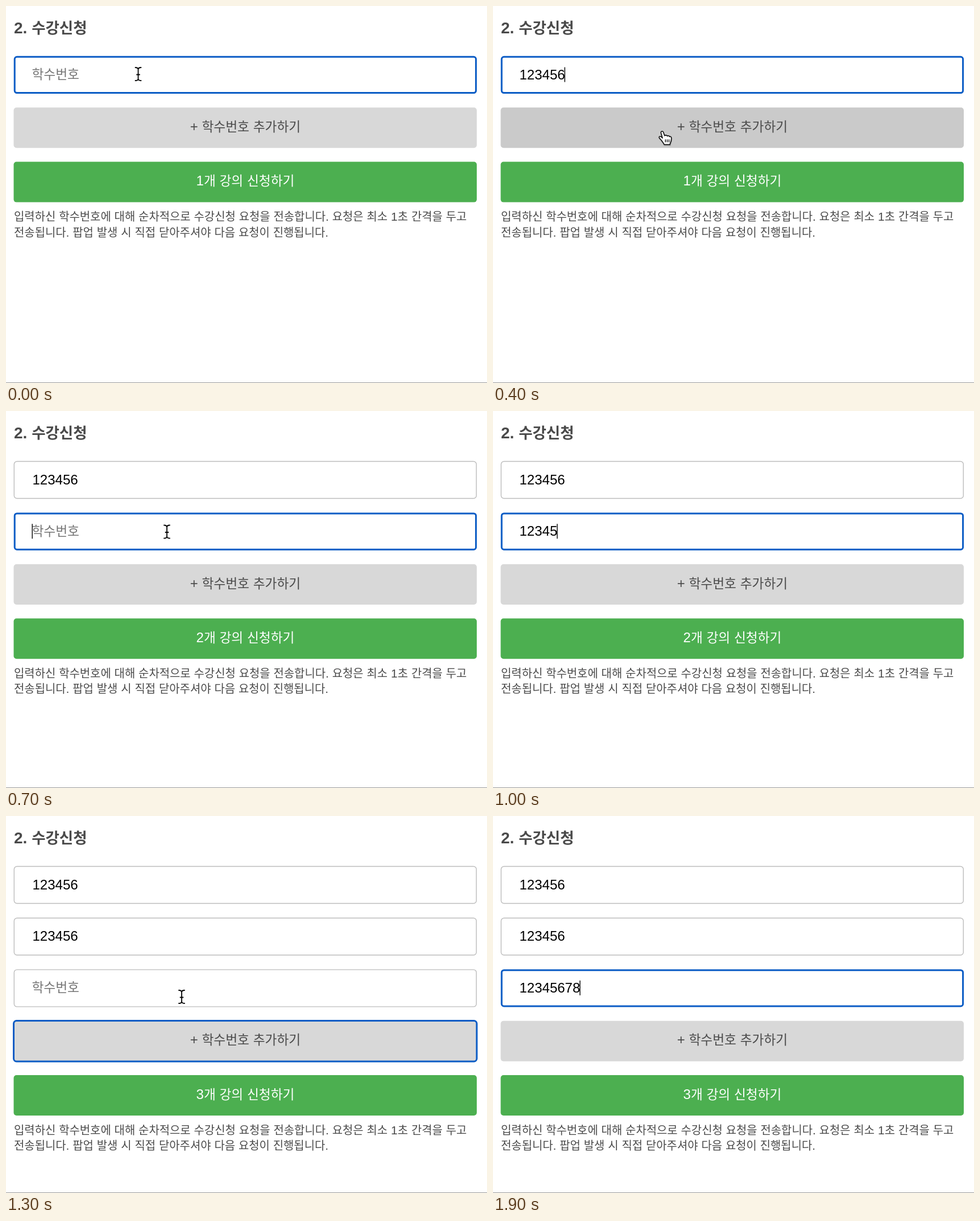
Recreate the animation shown at these times as an HTML page. Size 846 by 662 pixels, loop 2000 ms.

```html
<!DOCTYPE html>
<html lang="ko">
<head>
<meta charset="utf-8">
<title>수강신청</title>
<style>
  html, body { margin: 0; width: 100%; height: 100%; overflow: hidden; background: #fff; }
  svg { display: block; width: 846px; height: 662px; }
  text { font-family: "Liberation Sans", "Noto Sans CJK KR", "Noto Sans CJK", sans-serif; font-size: 24px; fill: #4a4a4a; }
  .ko { font-family: "Noto Sans CJK KR", "Noto Sans CJK", sans-serif; font-size: .946em; }
  .title { font-size: 28px; font-weight: 700; }
  .note { font-size: 21.05px; }
  .center { text-anchor: middle; }
  .value { fill: #000; }
  .hint { fill: #757575; }
  .white { fill: #fff; }
</style>
</head>
<body>
<svg id="stage" viewBox="0 0 846 662"></svg>
<script>
const STEP = 100, PITCH = 90.7, BLUE = '#0b5cc5', ADD = 'add';
const stage = document.getElementById('stage');

// Hangul runs are set slightly smaller than the Latin around them.
const text = (x, y, cls, str) =>
  `<text x="${x}" y="${y}" class="${cls}">${str.replace(/[가-힣]+/g, '<tspan class="ko">$&</tspan>')}</text>`;

const box = (x, y, w, h, fill, stroke = 'none', line = 0, r = 5) =>
  `<rect x="${x}" y="${y}" width="${w}" height="${h}" rx="${r}" fill="${fill}" stroke="${stroke}" stroke-width="${line}"/>`;

const beamPath = 'M-5 -11.5C-2 -11.5 0 -10.5 0 -8C0 -10.5 2 -11.5 5 -11.5M0 -8V8' +
  'M-5 11.5C-2 11.5 0 10.5 0 8C0 10.5 2 11.5 5 11.5M-2.5 1H2.5';
const handPath = 'M-7.6 -9.2C-8.3 -12.3 -4.2 -13 -3.2 -10L-1.2 -4.2C0 -5.7 3 -5.3 3.5 -3.5' +
  'C4.5 -4.9 7 -4.3 7.4 -2.5C9 -3.4 11 -2.2 10.8 0L10.4 4C10 6.3 8.6 7.8 8.2 11.2H-2' +
  'C-3 8.3 -5 6.7 -6.5 4.2C-8 2 -11 .2 -10.9 -1.5C-10.7 -3.6 -8 -3.3 -6 -1.2L-4.9 0Z';

const cursors = {
  beam: `<g fill="none" stroke-linecap="round"><path d="${beamPath}" stroke="#fff" stroke-width="4"/>
    <path d="${beamPath}" stroke="#000" stroke-width="1.8"/></g>`,
  hand: `<path d="${handPath}" transform="translate(.5 1.5)" fill="#0003" stroke="#0003" stroke-width="2"/>
    <path d="${handPath}" fill="#fff" stroke="#111" stroke-width="1.6" stroke-linejoin="round"/>
    <path d="M.3 2.2V7.2M3.4 2.2V7.2M6.5 2.2V7.2" stroke="#111" stroke-width="1.4"/>`
};

const typed = n => '12345678'.slice(0, n);

// [digits in each field, focus, caret shown, cursor, x, y]
const steps = [
  [[0], 0, false, 'beam', 232.5, 119.5],
  [[2], 0, true],
  [[4], 0, true],
  [[6], 0, true],
  [[6], 0, true, 'hand', 303, 232],
  [[6, 0], ADD, false, 'beam', 299, 219],
  [[6, 0], ADD, false, 'beam', 285, 213],
  [[6, 0], 1, true, 'beam', 283, 212],
  [[6, 1], 1, true],
  [[6, 3], 1, true],
  [[6, 5], 1, true],
  [[6, 6], 1, true],
  [[6, 6], 1, false, 'hand', 310, 324],
  [[6, 6, 0], ADD, false, 'beam', 309, 317.5],
  [[6, 6, 0], ADD, false, 'beam', 295, 305],
  [[6, 6, 0], 2, true, 'beam', 288, 303],
  [[6, 6, 2], 2, true],
  [[6, 6, 5], 2, true],
  [[6, 6, 7], 2, true],
  [[6, 6, 8], 2, true]
];

function field(count, row, focused, caret) {
  const y = 88 + row * PITCH;
  const frame = focused
    ? box(15.2, y + 1.3, 811.4, 63.2, '#fff', BLUE, 3, 4)
    : box(14.3, y + .5, 813, 65, '#fff', '#bdbdbd', 1.4);
  const label = count
    ? text(46.5, y + 40.6, 'value', typed(count))
    : text(45.5, y + 39.8, 'hint', '학수번호');
  const caretX = 45.5 + count * 13.35;
  return frame + label + (focused && caret ? box(caretX, y + 19.5, 1.4, 26, '#000', 'none', 0, 0) : '');
}

function draw([fields, focus, caret, cursor, x, y]) {
  const shift = (fields.length - 1) * PITCH;
  const addFill = cursor === 'hand' ? '#cacaca' : '#d8d8d8';
  const addButton = focus === ADD
    ? box(13.5, 178.2, 814.5, 71.4, addFill, BLUE, 3)
    : box(13.5, 178.3, 814.5, 71, addFill);
  stage.innerHTML =
    text(14, 48, 'title', '2. 수강신청') +
    fields.map((count, row) => field(count, row, focus === row, caret)).join('') +
    `<g transform="translate(0 ${shift})">` +
    addButton +
    text(421, 220, 'center', '+ 학수번호 추가하기') +
    box(13.5, 273.6, 814.5, 71, '#4caf50') +
    text(421, 315.3, 'center white', `${fields.length}개 강의 신청하기`) +
    text(14, 377.3, 'note', '입력하신 학수번호에 대해 순차적으로 수강신청 요청을 전송합니다. 요청은 최소 1초 간격을 두고') +
    text(14, 404.5, 'note', '전송됩니다. 팝업 발생 시 직접 닫아주셔야 다음 요청이 진행됩니다.') +
    '</g>' +
    box(0, 661, 846, 1, '#999', 'none', 0, 0) +
    (cursor ? `<g transform="translate(${x} ${y})">${cursors[cursor]}</g>` : '');
}

const start = performance.now();
let shown = -1;
function tick() {
  const index = Math.floor((performance.now() - start) / STEP) % steps.length;
  if (index !== shown) draw(steps[shown = index]);
  requestAnimationFrame(tick);
}
tick();
</script>
</body>
</html>
```
